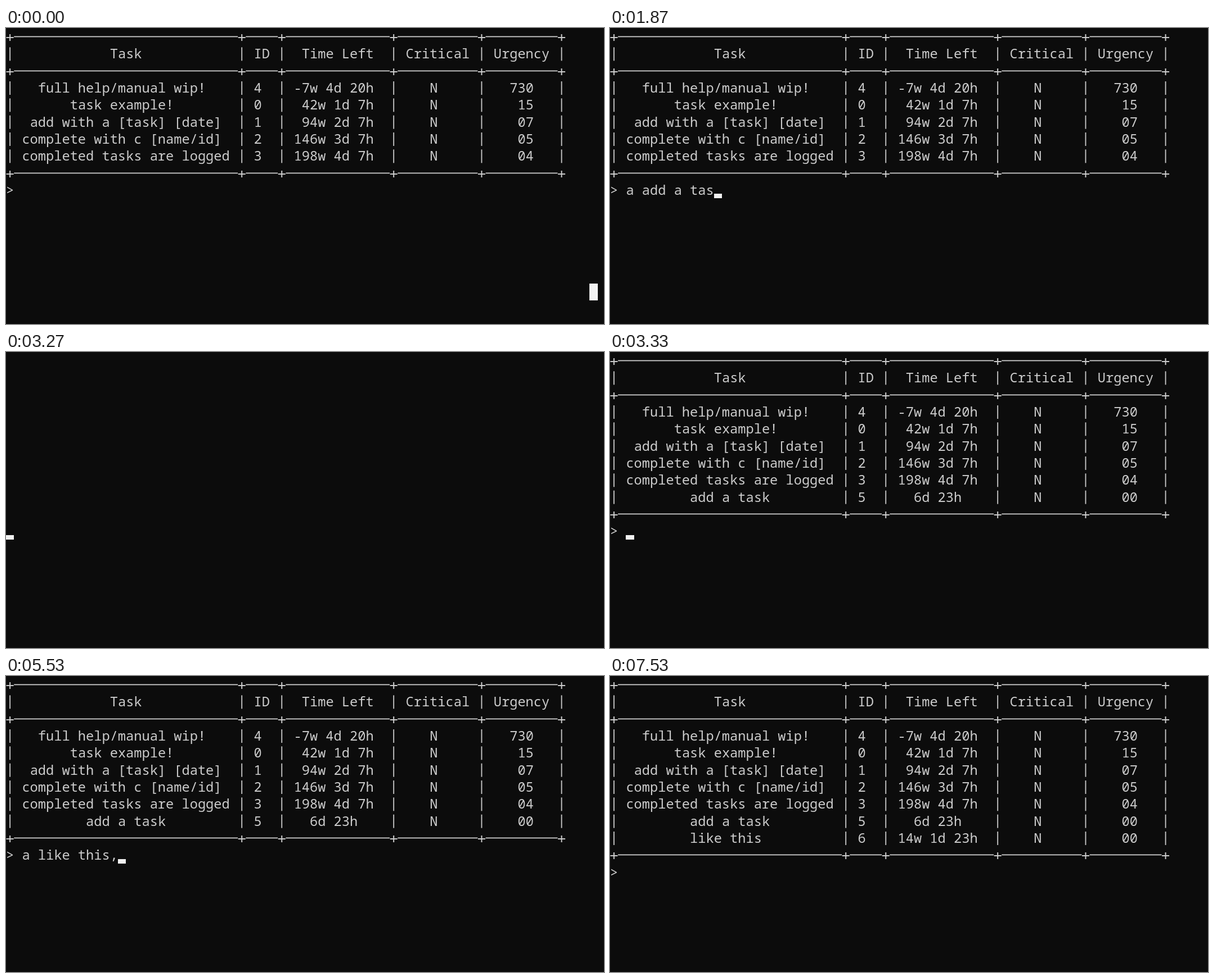
Animation, 1063 px wide and 527 px high, one loop 8 s. Source, as an HTML page with a canvas:

```html
<!DOCTYPE html>
<html lang="en">
<head>
<meta charset="utf-8">
<title>Task list terminal</title>
<style>
  html, body { margin: 0; height: 100%; overflow: hidden; background: #0c0c0c; }
  canvas { display: block; }
</style>
</head>
<body>
<canvas id="screen" width="1063" height="527"></canvas>
<script>
const ctx = document.getElementById('screen').getContext('2d');
const LOOP = 8000, CELL_W = 14.21, CELL_H = 30.33;
const PAPER = '#0c0c0c', INK = '#cccccc', CURSOR = '#f2f2f2';
const widths = [28, 4, 13, 10, 9];

const header = ['Task', 'ID', 'Time Left', 'Critical', 'Urgency'];
const tasks = [
  ['full help/manual wip!', '4', '-7w 4d 20h', 'N', '730'],
  ['task example!', '0', '42w 1d 7h', 'N', ' 15'],
  ['add with a [task] [date]', '1', '94w 2d 7h', 'N', ' 07'],
  ['complete with c [name/id]', '2', '146w 3d 7h', 'N', ' 05'],
  ['completed tasks are logged', '3', '198w 4d 7h', 'N', ' 04'],
  ['add a task', '5', '6d 23h', 'N', ' 00'],
  ['like this', '6', '14w 1d 23h', 'N', ' 00']
];

// Keys: a character is typed, '<' deletes, '^' hides the cursor,
// 'clear' wipes the screen, 'enter' drops the cursor a line, 'table' redraws with one more task.
const keys = [
  [130, 'a'], [600, '^'], [670, ' '], [870, 'a'], [930, 'd'], [1070, 'd'],
  [1200, '^'], [1270, ' '], [1400, 'a'], [1530, ' '], [1670, 't'], [1800, 'a'], [1870, 's'],
  [2200, '^'], [2330, 'l'], [2730, '<'], [2730, '^'], [2870, 'k'],
  [3270, 'clear'], [3330, 'table'],
  [4200, '^'], [4270, 'a'], [4330, ' '], [4530, 'l'], [4600, 'i'], [4730, 'k'], [4870, 'e'],
  [5070, ' '], [5200, 't'], [5270, 'h'], [5330, 'i'], [5470, 's'], [5530, ','],
  [5930, '^'], [6070, '1'], [6130, '0'], [6270, '0'], [6330, 'd'], [6470, '^'],
  [6730, 'enter'], [6800, 'table'], [7530, '^']
];

function stateAt(time) {
  const s = { count: 5, typed: '', cursor: false, mode: '' };
  for (const [at, key] of keys) {
    if (at > time) break;
    s.cursor = key !== '^';
    if (key === 'clear' || key === 'enter') s.mode = key;
    else if (key === 'table') { s.count++; s.typed = ''; s.mode = ''; }
    else if (key === '<') s.typed = s.typed.slice(0, -1);
    else if (key !== '^') s.typed += key;
  }
  return s;
}

const text = (str, col, row) => ctx.fillText(str, col * CELL_W, row * CELL_H + 24);

function eachEdge(draw) {
  let col = 0;
  draw(col, 0);
  for (const w of widths) draw(col += w + 1, w);
}

function rule(row) {
  const y = Math.round(row * CELL_H);
  eachEdge((col, w) => {
    const x = (col + 0.5) * CELL_W;
    ctx.fillRect(x - 6.5, y + 16, 13, 2);
    ctx.fillRect(x - 1, y + 11, 2, 12);
    ctx.fillRect((col - w) * CELL_W, y + 14.5, w * CELL_W, 1.8);
  });
}

function tableRow(cells, row) {
  eachEdge(col => ctx.fillRect((col + 0.5) * CELL_W - 0.9, row * CELL_H + 4, 1.8, 24));
  let col = 1;
  cells.forEach((cell, i) => {
    text(cell, col + Math.floor((widths[i] - cell.length) / 2), row);
    col += widths[i] + 1;
  });
}

function block(col, row, height) {
  const x = Math.round(col * CELL_W), bottom = Math.round((row + 1) * CELL_H);
  ctx.fillStyle = CURSOR;
  ctx.fillRect(x, bottom - height, Math.round((col + 1) * CELL_W) - x, height);
}

function render(time) {
  const { count, typed, cursor, mode } = stateAt(time);
  const promptRow = count + 4;
  ctx.fillStyle = PAPER;
  ctx.fillRect(0, 0, 1063, 527);
  ctx.fillStyle = INK;
  ctx.font = '23.68px "Noto Sans Mono", monospace';
  if (mode !== 'clear') {
    [0, 2, count + 3].forEach(rule);
    tableRow(header, 1);
    tasks.slice(0, count).forEach((task, i) => tableRow(task, i + 3));
    text('> ' + typed, 0, promptRow);
  }
  if (cursor) {
    if (mode) block(0, promptRow + 1, 8);
    else block(2 + typed.length, promptRow, 8);
  }
  if (time < 130) block(73, 15, 30);
}

function tick() {
  render(performance.now() % LOOP);
  requestAnimationFrame(tick);
}
tick();
</script>
</body>
</html>
```
